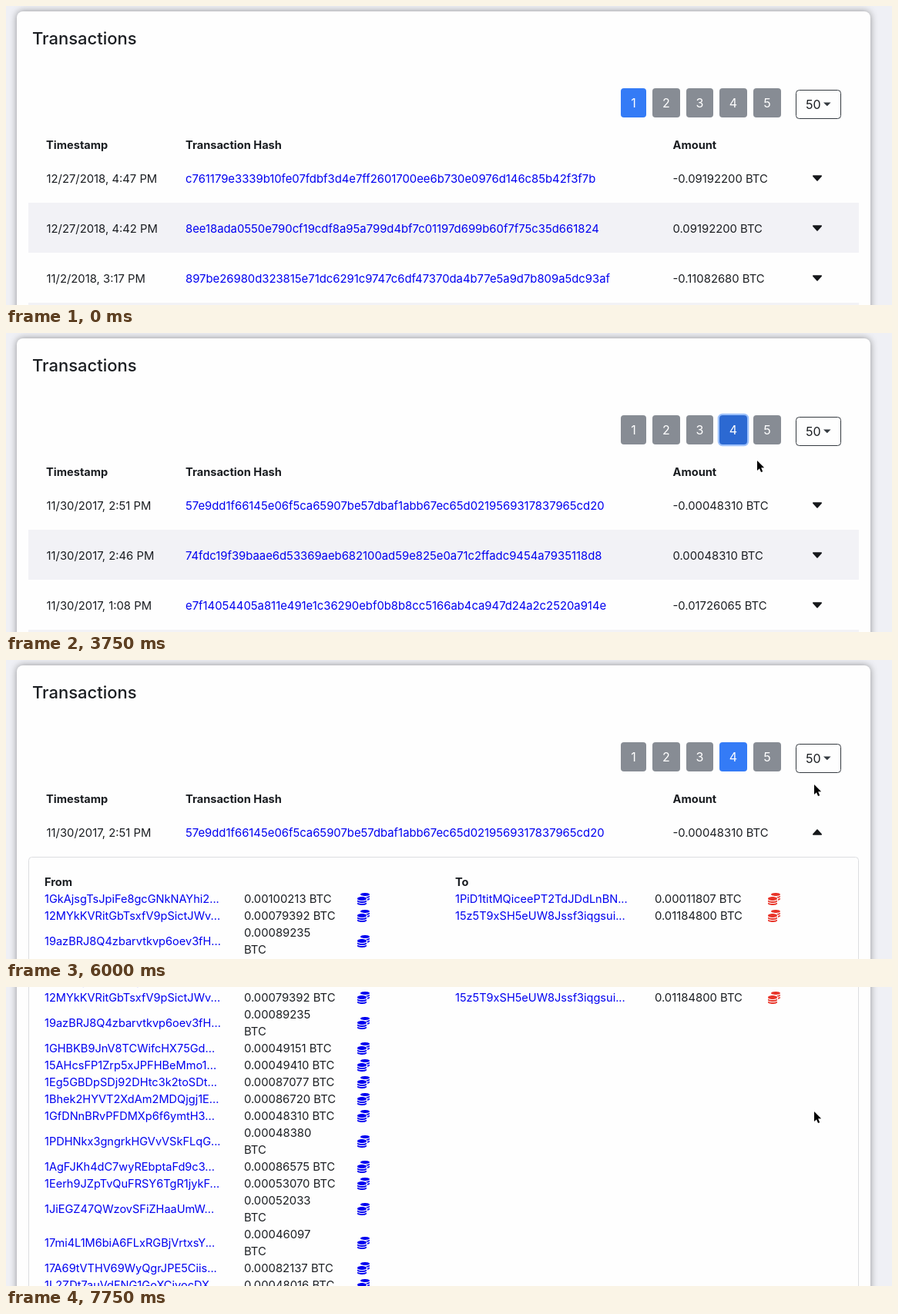
Recreate the animation shown at these times as an HTML page. Size 1150 px wide and 389 px high, loop 8000 ms.

```html
<!DOCTYPE html>
<html lang="en">
<head>
<meta charset="utf-8">
<title>Transactions</title>
<style>
html, body { margin: 0; width: 1150px; height: 389px; overflow: hidden; background: #eff0f5; }
svg { display: block; }
text { font: 14.83px Inter, "Open Sans", sans-serif; fill: #1b1e22; white-space: pre; }
.title { font-size: 22px; font-weight: 500; }
.head { font-size: 14.6px; font-weight: 700; }
.link { fill: #0000f0; }
.address { font-size: 14.55px; }
.page { font-size: 16px; fill: #fff; text-anchor: middle; }
.size { font-size: 16px; }
.card { fill: #fefefe; filter: drop-shadow(0 0 5px rgba(0, 0, 0, .4)); }
</style>
</head>
<body>
<svg id="stage" width="1150" height="389"></svg>
<script>
const STEP = 250, LOOP = 8000;
const stage = document.getElementById('stage');

const pages = {
  1: [
    ['12/27/2018, 4:47 PM', 'c761179e3339b10fe07fdbf3d4e7ff2601700ee6b730e0976d146c85b42f3f7b', '-0.09192200'],
    ['12/27/2018, 4:42 PM', '8ee18ada0550e790cf19cdf8a95a799d4bf7c01197d699b60f7f75c35d661824', '0.09192200'],
    ['11/2/2018, 3:17 PM', '897be26980d323815e71dc6291c9747c6df47370da4b77e5a9d7b809a5dc93af', '-0.11082680']
  ],
  2: [
    ['6/16/2018, 7:52 PM', '2aca50541342e89e3147750cb94dd30bbcd860a5c5abf7a161b6156ad3e89686', '-0.00612345'],
    ['6/16/2018, 7:43 PM', '87a62e2b8f7299c93b729739470ead4a47159fa8ed57f989c3ece530cd7243db', '0.00612345'],
    ['6/14/2018, 8:27 PM', '07c406d8cf3badeb75123fbb41090abbb207d57b3a9797359f0f6e3d6d80e668', '-0.01203852']
  ],
  4: [
    ['11/30/2017, 2:51 PM', '57e9dd1f66145e06f5ca65907be57dbaf1abb67ec65d0219569317837965cd20', '-0.00048310'],
    ['11/30/2017, 2:46 PM', '74fdc19f39baae6d53369aeb682100ad59e825e0a71c2ffadc9454a7935118d8', '0.00048310'],
    ['11/30/2017, 1:08 PM', 'e7f14054405a811e491e1c36290ebf0b8b8cc5166ab4ca947d24a2c2520a914e', '-0.01726065']
  ]
};

// A trailing * marks an amount that wraps onto a second line.
const inputs = `1GkAjsgTsJpiFe8gcGNkNAYhi2 0.00100213
12MYkKVRitGbTsxfV9pSictJWv 0.00079392
19azBRJ8Q4zbarvtkvp6oev3fH 0.00089235*
1GHBKB9JnV8TCWifcHX75Gd 0.00049151
15AHcsFP1Zrp5xJPFHBeMmo1 0.00049410
1Eg5GBDpSDj92DHtc3k2toSDt 0.00087077
1Bhek2HYVT2XdAm2MDQjgj1E 0.00086720
1GfDNnBRvPFDMXp6f6ymtH3 0.00048310
1PDHNkx3gngrkHGVvVSkFLqG 0.00048380*
1AgFJKh4dC7wyREbptaFd9c3 0.00086575
1Eerh9JZpTvQuFRSY6TgR1jykF 0.00053070
1JiEGZ47QWzovSFiZHaaUmW 0.00052033*
17mi4L1M6biA6FLxRGBjVrtxsY 0.00046097*
17A69tVTHV69WyQgrJPE5Ciis 0.00082137
1L2ZDt7auVdFNG1GoXCivocDX 0.00048016`;
const outputs = `1PiD1titMQiceePT2TdJDdLnBN 0.00011807
15z5T9xSH5eUW8Jssf3iqgsui 0.01184800`;

// Pointer stops: time, x, y
const pointer = [
  [250, 804, 2], [500, 814, 40], [750, 841, 98], [1000, 850, 118],
  [2500, 850, 118], [3000, 938, 119], [3500, 942, 124], [3750, 975, 166],
  [4000, 1015, 208], [4250, 1042, 231], [5000, 1042, 231], [5500, 1049, 162], [LOOP, 1049, 162]
];
// Page offset stops: time, y
const scroll = [
  [0, 0], [6000, 0], [6250, 34], [6500, 64], [6750, 40],
  [7000, -50], [7250, -165], [7500, -265], [7750, -319], [LOOP, -319]
];

function at(stops, t) {
  const i = stops.findIndex(s => s[0] > t);
  const a = stops[i - 1], b = stops[i];
  const k = (t - a[0]) / (b[0] - a[0]);
  return a.slice(1).map((v, j) => Math.round(v + (b[j + 1] - v) * k));
}

// cy is the middle of the capitals
const text = (x, cy, s, cls = '', size = 14.8) =>
  `<text x="${x}" y="${cy + size * .364}" class="${cls}">${s}</text>`;

const rect = (x, y, w, h, fill, extra = '') =>
  `<rect x="${x}" y="${y}" width="${w}" height="${h}" fill="${fill}" ${extra}/>`;

const caret = (cy, up) =>
  `<path transform="translate(1053 ${cy}) scale(1 ${up ? -1 : 1})" d="M-5.2-2.9H5.2L0 2.9Z"
    fill="#16181b" stroke="#16181b" stroke-width="1.6" stroke-linejoin="round"/>`;

const coins = (x, cy, color) =>
  `<path transform="translate(${x} ${cy - 8}) scale(.03125)" fill="${color}" d="M0 405V448c0 35 86 64 192 64s192-29 192-64v-43
    C343 434 267 448 192 448S41 434 0 405zM320 128c106 0 192-29 192-64S426 0 320 0 128 29 128 64s86 64 192 64z
    M0 300V352c0 35 86 64 192 64s192-29 192-64v-52c-41 34-117 52-192 52S41 334 0 300zm416 11c57-11 96-31 96-55v-43
    c-23 17-57 28-96 35zM192 160C86 160 0 196 0 240s86 80 192 80 192-36 192-80-86-80-192-80z
    m219 56c60-11 101-32 101-56v-43c-36 25-97 39-161 42 30 14 51 33 60 57z"/>`;

function transfers(list, x, color) {
  let y = 300;
  return list.split('\n').map(line => {
    const [address, value] = line.split(' ');
    const wraps = value.endsWith('*'), amount = value.replace('*', '');
    const h = wraps ? 44 : 22, cy = y + h / 2;
    y += h;
    return text(x, cy, address + '...', 'link address') + coins(x + 406, cy, color) +
      (wraps ? text(x + 259, cy - 11, amount) + text(x + 259, cy + 11, 'BTC')
             : text(x + 259, cy, amount + ' BTC'));
  }).join('');
}

const details = text(50, 289, 'From', 'head') + text(583, 289, 'To', 'head') +
  transfers(inputs, 50, '#0000f0') + transfers(outputs, 583, '#e8352a');

function pager(active, focus) {
  return [[798, 33], [839, 36], [883, 35], [926, 36], [970, 36]].map(([x, w], i) => {
    const n = i + 1, on = n === active, lit = n === focus;
    const fill = on ? (lit ? '#2c69d2' : '#347bf6') : (lit ? '#727881' : '#878c94');
    const ring = lit ? rect(x - 1, 106, w + 2, 40, 'none',
      `rx="5" stroke="${on ? '#9dc1fb' : '#ced1d6'}" stroke-width="2.5"`) : '';
    return ring + rect(x, 107, w, 38, fill, 'rx="4"') + text(x + w / 2, 126, n, 'page', 16);
  }).join('');
}

function row([time, hash, amount], i, y, hover, open) {
  const fill = hover ? '#e0e2eb' : i % 2 ? '#f2f2f6' : 'none';
  return rect(29, y, 1078, 65, fill) + text(52.5, y + 33.5, time) + text(233, y + 33.5, hash, 'link') +
    text(865.5, y + 33.5, amount + ' BTC') + caret(y + 33, open);
}

function draw(t) {
  const [dy] = at(scroll, t);
  const [px, py] = t < 250 ? [-30, 0] : at(pointer, t);
  const page = t < 2000 ? 1 : t < 3250 ? 2 : 4;
  const active = t < 2250 ? 1 : t < 3500 ? 2 : 4;
  const focus = t < 2000 || t >= 4500 ? 0 : page;
  const panel = t < 4500 ? 0 : t < 4750 ? 76 : 900;
  const hover = dy === 0 && py > 191 && py < 256;

  const rows = pages[page].map((r, i) =>
    row(r, i, 191 + 65 * i + (i ? panel : 0), !i && hover, !i && panel)).join('');
  const open = panel ? `<svg y="256" width="1150" height="${panel}" viewBox="0 256 1150 ${panel}">` +
    rect(29.5, 256.5, 1077, 899, '#fefefe', 'rx="4" stroke="#dcdde0"') + details + '</svg>' : '';

  stage.innerHTML = `<g transform="translate(0 ${dy})">` +
    rect(14, -300, 1108, 255, '', 'rx="8" class="card"') +
    rect(14, 7, 1108, 1500, '', 'rx="8" class="card"') +
    text(34, 42, 'Transactions', 'title', 22) +
    pager(active, focus) +
    rect(1025.5, 109.5, 58, 37, '#fefefe', 'rx="4" stroke="#343a40"') +
    text(1038, 128.5, '50', 'size', 16) +
    '<path d="M1061 125.5h9.6l-4.8 4.8z" fill="#343a40"/>' +
    text(52, 181, 'Timestamp', 'head') + text(233, 181, 'Transaction Hash', 'head') +
    text(865.5, 181, 'Amount', 'head') +
    rows + rect(29, 386 + panel, 1078, 65, '#f2f2f6') + open + '</g>' +
    `<path transform="translate(${px} ${py}) scale(.9)" d="M0 0V14.5L3.3 11.4 5.6 16.8 8 15.8 5.7 10.4H10.2Z"
      stroke="#fff" stroke-width="2" paint-order="stroke"/>`;
}

let shown = -1;
function frame() {
  const t = Math.floor(performance.now() % LOOP / STEP) * STEP;
  if (t !== shown) draw(shown = t);
  requestAnimationFrame(frame);
}
frame();
</script>
</body>
</html>
```
